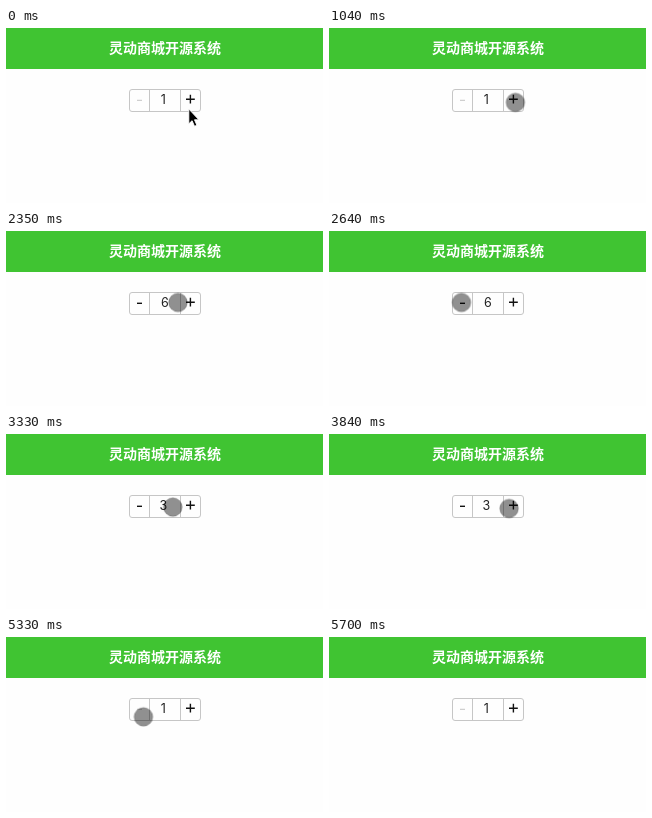
Recreate the animation shown at these times as an HTML page. Size 317x175 px, loop 6.42 s.

```html
<!DOCTYPE html>
<html lang="zh-CN">
<head>
<meta charset="utf-8">
<title>Stepper</title>
<style>
html, body { margin: 0; width: 100%; height: 100%; overflow: hidden; background: #fefefe; }
svg { display: block; width: 100%; height: 100%; }
.title { font: 700 14px "Noto Sans CJK SC", "Noto Sans CJK", sans-serif; fill: #fff; text-anchor: middle; }
.digits { font: 400 12.5px Inter, sans-serif; fill: #222; text-anchor: middle; }
.frame { fill: none; stroke: #c6c6c6; }
.sign { fill: none; stroke: #111; stroke-width: 1.4; }
.digits, .minus, .touch, .arrow { animation: 6420ms infinite; }

/* each value sits 20px below the previous one */
.digits { animation-name: count; animation-timing-function: step-end; }
@keyframes count {
  0% { transform: translateY(0); }
  20.71% { transform: translateY(-20px); }
  23.98% { transform: translateY(-40px); }
  29.12% { transform: translateY(-60px); }
  31.3% { transform: translateY(-80px); }
  34.11% { transform: translateY(-100px); }
  45.32% { transform: translateY(-80px); }
  47.5% { transform: translateY(-60px); }
  49.99% { transform: translateY(-40px); }
  52.33% { transform: translateY(-20px); }
  57% { transform: translateY(-40px); }
  60.27% { transform: translateY(-60px); }
  67.44% { transform: translateY(-40px); }
  70.24% { transform: translateY(-20px); }
  73.51%, 100% { transform: translateY(0); }
}

.minus { animation-name: enable; animation-timing-function: step-end; }
@keyframes enable {
  0% { stroke: #c4c4c4; stroke-width: 1px; }
  20.71% { stroke: #111; stroke-width: 1.4px; }
  73.51%, 100% { stroke: #c4c4c4; stroke-width: 1px; }
}

.arrow { animation-name: leave; animation-timing-function: step-end; }
@keyframes leave {
  0% { opacity: 1; }
  .93% { opacity: .5; }
  1.24%, 100% { opacity: 0; }
}

.touch { animation-name: roam; animation-timing-function: ease-in-out; }
@keyframes roam {
  0%, 4.04% { transform: translate(187px, 88px); visibility: hidden; }
  4.05% { transform: translate(187px, 88px); visibility: visible; }
  9.34%, 16.2% { transform: translate(186.4px, 74.4px); }
  20.71%, 34.11% { transform: translate(186.4px, 71.5px); }
  41.11%, 50% { transform: translate(132.5px, 71.5px); }
  53.27%, 59.1% { transform: translate(187px, 74px); animation-timing-function: ease-in; }
  59.81% { transform: translate(180.5px, 74.5px); animation-timing-function: ease-out; }
  63.86%, 81.7% { transform: translate(130.5px, 73.5px); animation-timing-function: ease-in; }
  88.77% { transform: translate(254px, 186px); visibility: visible; }
  88.78%, 100% { transform: translate(254px, 186px); visibility: hidden; }
}
</style>
</head>
<body>
<svg viewBox="0 0 317 175">
  <clipPath id="window"><rect x="145" y="63" width="28" height="19"/></clipPath>
  <rect width="317" height="41" fill="#40c432"/>
  <text class="title" x="159" y="24.6">灵动商城开源系统</text>

  <rect class="frame" x="123.5" y="61.5" width="71" height="22" rx="2.5"/>
  <path class="frame" d="M143.5 61.5v22M174.5 61.5v22"/>
  <path class="sign minus" d="M131 72.3h5"/>
  <path class="sign" d="M180 71.2h8.8M184.4 66.8v8.8"/>
  <g clip-path="url(#window)">
    <text class="digits">
      <tspan x="159" y="76.3">1</tspan>
      <tspan x="159" dy="20">2</tspan>
      <tspan x="159" dy="20">3</tspan>
      <tspan x="159" dy="20">4</tspan>
      <tspan x="159" dy="20">5</tspan>
      <tspan x="159" dy="20">6</tspan>
    </text>
  </g>

  <path class="arrow" d="M182.8 81v14.8l3.3-3.1 2.4 5.6 2.4-1-2.4-5.5h4.4z" fill="#000" stroke="#fff" stroke-width=".9"/>
  <circle class="touch" r="9.3" fill="#000" fill-opacity=".43" stroke="#000" stroke-opacity=".25" stroke-width=".8"/>
</svg>
</body>
</html>
```
